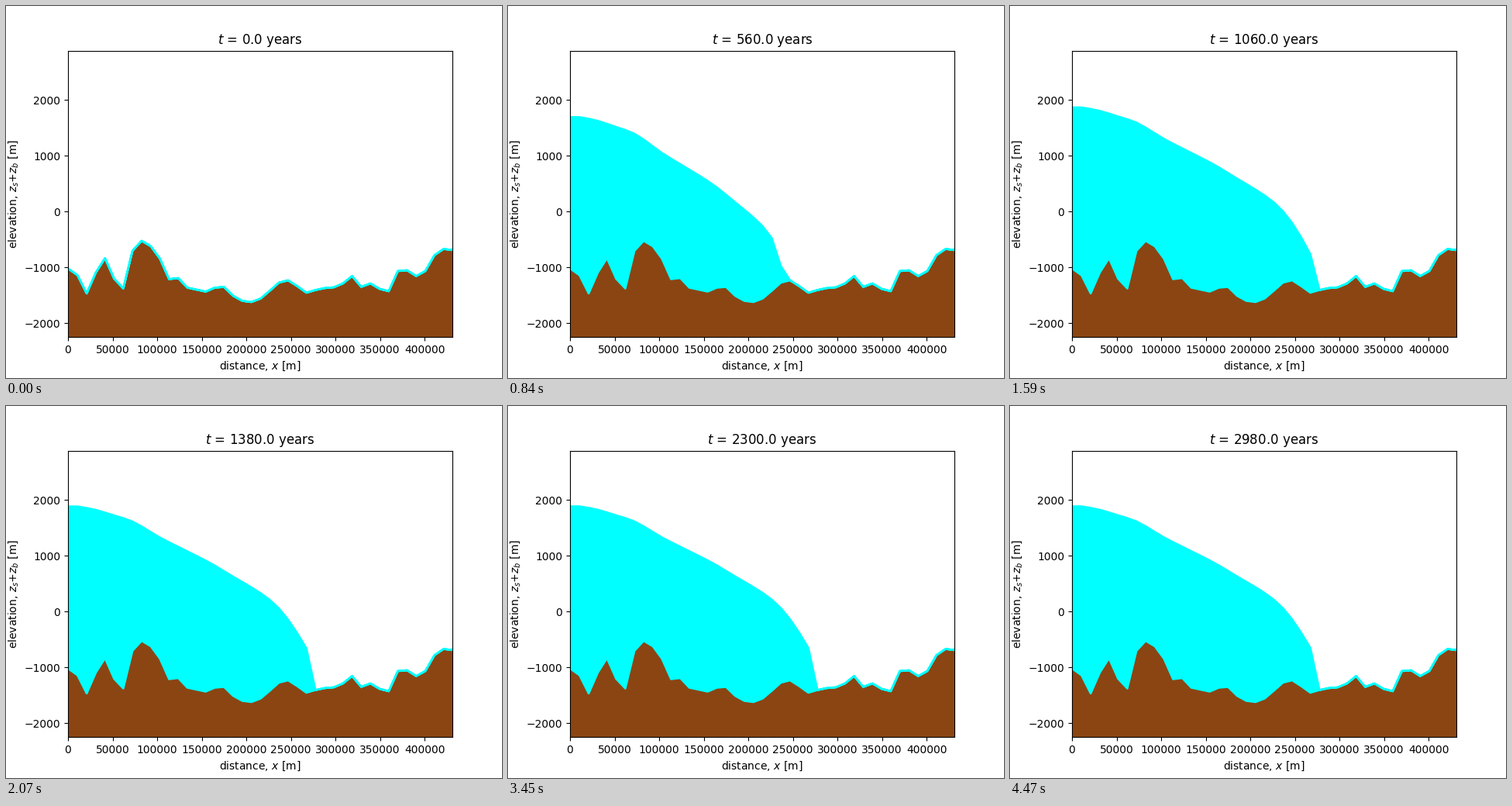
These frames come from a looping animation (640x480 px, 4500 ms). A matplotlib script:

```python
import numpy as np
import matplotlib.pyplot as plt
from matplotlib.animation import FuncAnimation

FRAMES, INTERVAL = 150, 30
YEARS_PER_FRAME = 20
STEPS = 400                      # solver steps per frame
DT = YEARS_PER_FRAME / STEPS
LENGTH = 431150                  # metres
FLOOR, TOP = -2246, 2887
GAMMA = 2.4e-5                   # ice flow factor
SNOW = 14.8                      # balance at the divide, m per year
EQUILIBRIUM = 13.85              # node where the balance is zero

# Bedrock depth in metres at evenly spaced nodes
BED = -np.array([
    1014, 1132, 1458, 1083, 826, 1194, 1368, 694, 514, 611, 833, 1201, 1181,
    1354, 1389, 1424, 1354, 1340, 1500, 1590, 1611, 1549, 1410, 1264, 1222,
    1326, 1444, 1396, 1361, 1347, 1278, 1146, 1340, 1278, 1375, 1417, 1056,
    1042, 1146, 1056, 771, 660, 681])
NODES = len(BED)
X = np.linspace(0, LENGTH, NODES)
DX = X[1]
BALANCE = SNOW * (1 - np.arange(NODES) / EQUILIBRIUM)


def step(ice):
    """Advance the shallow-ice thickness by DT in place."""
    slope = np.diff(BED + ice) / DX
    depth = (ice[1:] + ice[:-1]) / 2
    flux = -GAMMA * depth**5 * slope * slope * slope
    flux[0] = 0
    ice[1:-1] += DT * (BALANCE[1:-1] - np.diff(flux) / DX)
    np.maximum(ice, 0, out=ice)
    ice[0] = max(ice[1] + BED[1] - BED[0], 0)    # flat surface at the divide


def simulate():
    """Ice surface at every frame."""
    ice = np.zeros(NODES)
    surfaces = []
    for _ in range(FRAMES):
        surfaces.append(BED + ice)
        for _ in range(STEPS):
            step(ice)
    return surfaces


def band(low, high):
    return [np.r_[np.c_[X, low], np.c_[X, high][::-1]]]


surfaces = simulate()

fig, ax = plt.subplots(figsize=(6.4, 4.8), dpi=100)
ax.set_xlim(0, LENGTH)
ax.set_ylim(FLOOR, TOP)
ax.set_xlabel("distance, $x$ [m]")
ax.set_ylabel("elevation, $z_s$+$z_b$ [m]")
title = ax.set_title("")
ax.fill_between(X, FLOOR, BED, color="saddlebrown", lw=0)
glacier = ax.fill_between(X, BED, BED, color="cyan", lw=1.9)


def update(frame):
    glacier.set_verts(band(BED, surfaces[frame]))
    title.set_text(f"$t$ = {frame * YEARS_PER_FRAME:.1f} years")
    return glacier, title


anim = FuncAnimation(fig, update, frames=FRAMES, interval=INTERVAL,
                     repeat=True, repeat_delay=0)
plt.show()
```
